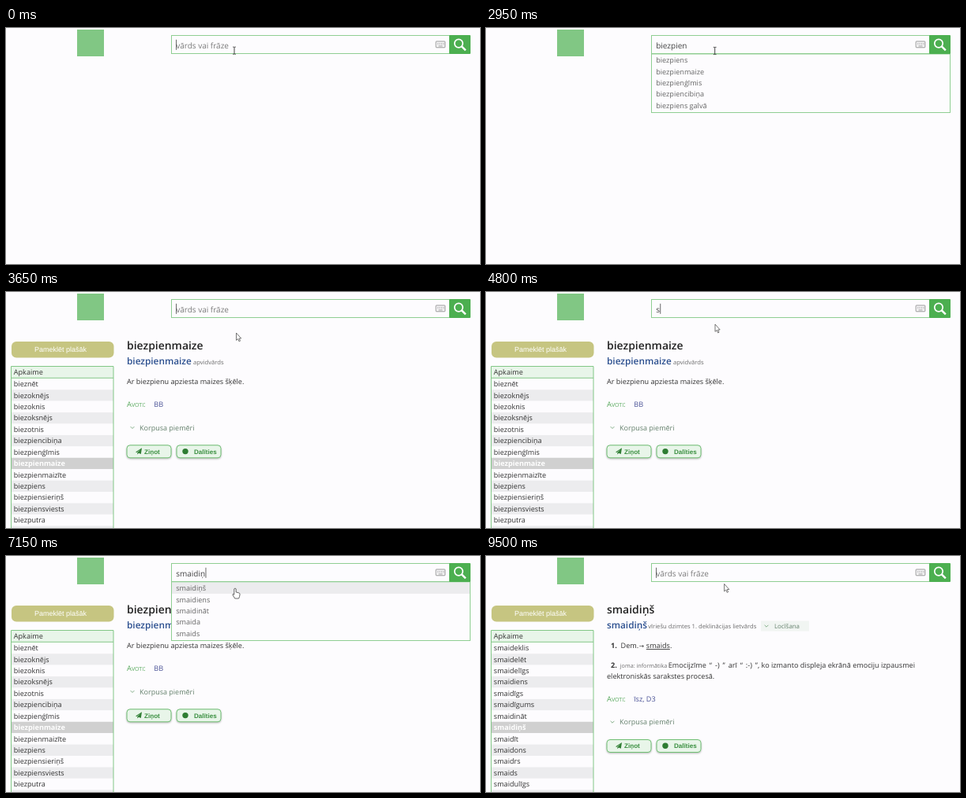
Animation of 600x300 px, one loop 9650 ms. Source, as an HTML page:

```html
<!DOCTYPE html>
<html lang="lv">
<head>
<meta charset="utf-8">
<title>Vārdnīca</title>
<style>
html, body { margin: 0; width: 100%; height: 100%; overflow: hidden; background: #fdfcfe; }
svg { display: block; width: 600px; height: 300px; }
text { font: 9.1px "Open Sans", "Noto Sans", sans-serif; fill: #333; white-space: pre; text-rendering: geometricPrecision; }
.field { font-size: 10px; fill: #444; }
.hint { fill: #7a7a7a; }
.item { fill: #666; }
.title { font-size: 13.95px; font-weight: 600; fill: #212121; }
.word { font-size: 11.8px; font-weight: 600; fill: #2b4f8f; }
.note { font-size: 7.65px; fill: #6c6c6c; }
.topic { font-size: 7.2px; fill: #6c6c6c; }
.arrow { font: 7.5px "DejaVu Sans", sans-serif; }
.quotes { word-spacing: 1.6px; }
.bold { font-weight: 700; }
.link { text-decoration: underline; }
.label { font-size: 9.4px; font-variant: small-caps; fill: #57a85c; }
.ref { fill: #4a5296; }
.more { font-size: 9px; fill: #64806c; }
.small { font-size: 7.9px; }
.row.on { font-weight: 700; fill: #fff; }
.btn { font: bold 8.1px "Liberation Sans", Arial, sans-serif; fill: #3a8f40; }
.wide { font: 9px "Liberation Sans", Arial, sans-serif; fill: #fff; }
.green { stroke: #8fce92; }
.edge { stroke: #6fbf73; }
.shade { filter: drop-shadow(0 1px 1.2px rgba(0, 0, 0, .28)); }
</style>
</head>
<body>
<svg id="stage" viewBox="0 0 600 300"></svg>
<script>
const LOOP = 9650, TICK = 50, ROW = 14.42;
const stage = document.getElementById("stage");

const rect = (x, y, w, h, fill, more = "") =>
  `<rect x="${x}" y="${y}" width="${w}" height="${h}" fill="${fill}" ${more}/>`;
const text = (x, y, s, cls = "", more = "") =>
  `<text x="${x}" y="${y}" class="${cls}" ${more}>${s}</text>`;
const path = (d, stroke, width = 1, fill = "none") =>
  `<path d="${d}" fill="${fill}" stroke="${stroke}" stroke-width="${width}" stroke-linejoin="round"/>`;
const chevron = (x, y) => path(`M${x - 2.4} ${y - 1.2}l2.4 2.4 2.4-2.4`, "#78a67d", .9);

function sidebar(words) {
  const rows = words.split(" ").map((word, i) => {
    const y = 109.8 + i * ROW, on = i === 7;
    const fill = on ? "#d0d0d0" : i % 2 ? "#ececee" : "#fdfcfe";
    return rect(7, y, 129, ROW, fill) + text(9.8, y + 10.4, word, on ? "row on" : "row");
  }).join("");
  return rect(7, 63, 129.5, 20.5, "#c6c581", 'rx="6"') +
    text(69, 76.3, "Pameklēt plašāk", "wide", 'text-anchor="middle"') +
    rows + rect(7, 94.5, 129, 14.5, "#e8f5e9") +
    text(9.8, 105.2, "Apkaime") +
    path("M6.5 300V94.5H136V300M6.5 109.3H136", "#82c786");
}

function button(x, label, icon) {
  return rect(x, 194.8, 56, 16, "#e8f5e9", 'rx="4" class="edge shade"') +
    icon + text(x + 22, 205.6, label, "btn");
}

function footer(dy, refs) {
  const plane = path("M164 203.6L172 198.2 170.8 206 167.9 204.8 166.4 206.6 166.3 204.2 170.3 200.3 165.5 204.1Z",
    "none", 0, "#2e7d32");
  const dot = '<circle cx="227" cy="202.6" r="3.7" fill="#2e7d32"/>';
  return `<g transform="translate(0 ${dy})">` +
    text(153, 146.2, "Avoti:", "label") + text(187.3, 146.2, refs, "ref") +
    chevron(160, 172.3) + text(169, 175.6, "Korpusa piemēri", "more") +
    button(153, "Ziņot", plane) + button(216, "Dalīties", dot) + "</g>";
}

const head = (word) => text(153, 73.2, word, "title") + text(153, 92, word, "word");

const pages = [
  "",
  sidebar("bieznēt biezoknējs biezoknis biezoksnējs biezotnis biezpiencibiņa biezpienģīmis " +
    "biezpienmaize biezpienmaizīte biezpiens biezpiensieriņš biezpiensviests biezputra &#32;") +
  head("biezpienmaize") + text(237, 92, "apvidvārds", "note") +
  text(153, 117.4, "Ar biezpienu apziesta maizes šķēle.") + footer(0, "BB"),

  sidebar("smaideklis smaidelēt smaidelīgs smaidiens smaidīgs smaidīgums smaidināt " +
    "smaidiņš smaidīt smaidons smaidrs smaids smaidulīgs &#32;") +
  head("smaidiņš") + text(205.3, 92, "vīriešu dzimtes 1. deklinācijas lietvārds", "note") +
  rect(348, 82.5, 61, 13, "#f1f5f2") + chevron(355, 89) +
  text(365, 91.8, "Locīšana", "more small") +
  text(158, 117.2, "1.", "bold") + text(170.5, 117.2, "Dem.") + text(193.8, 117, "→", "arrow") +
  text(202.8, 117.2, '<tspan class="link">smaids</tspan>.') +
  text(158, 141.7, "2.", "bold") + text(169.8, 141.7, "joma: informātika", "topic") +
  text(230.8, 141.7, "Emocijzīme “ -) ” arī “ :-) ”,", "quotes") +
  text(348.6, 141.7, "ko izmanto displeja ekrānā emociju izpausmei") +
  text(153, 156.1, "elektroniskās sarakstes procesā.") + footer(38.7, "īsz, D3")
];

const keyboard = rect(544.2, 17, 11.6, 7.8, "none", 'stroke="#8c8c8c" stroke-width=".9" rx=".6"') +
  `<path d="M546 19.4h9M546 21.1h9" stroke="#999" stroke-width=".9" stroke-dasharray="1 .7"/>` +
  path("M547.5 23h5", "#999", .9);
const lens = '<circle cx="573" cy="19.6" r="5.2" fill="none" stroke="#fff" stroke-width="1.7"/>' +
  path("M576.8 23.4L581.8 28.3", "#fff", 2.5);

stage.innerHTML =
  rect(90, 2, 34, 34, "#81c784") +
  pages.map((p) => `<g class="page">${p}</g>`).join("") +
  `<g id="drop">${rect(209.5, 33, 378, 74.5, "#fdfcfe", 'class="green"')}` +
  rect(210, 0, 377, 14.2, "#ececee", 'id="hover"') +
  [0, 1, 2, 3, 4].map((i) => text(215.2, 44.1 + i * 14.4, "", "item")).join("") + "</g>" +
  rect(209.5, 9.5, 352, 23, "#fdfcfe", 'class="green"') + keyboard +
  rect(561, 9, 27, 24, "#4caf50", 'rx="1"') + lens +
  text(215.2, 25.5, "", "field", 'id="field"') +
  rect(0, 14.8, .8, 13, "#444", 'id="caret"') +
  '<g id="mouse">' +
  path("M-1.8-4.6H-.5L0-4 .5-4.6H1.8M0-4V4M-1.8 4.6H-.5L0 4 .5 4.6H1.8", "#333", .9) +
  path("M-1.2 .8Q0-.8 1.2 .8V5L4.6 5.8Q6.2 6.2 6.1 7.8L5.5 10.8 4.6 13H-.2L-3 8.7Q-3.5 7.2-2.1 7.4L-1.2 8.2Z", "#444", .8, "#fff") +
  path("M0 0V9.4L2.1 7.5 3.6 10.9 5 10.2 3.6 7H6.2Z", "#555", .8, "#fff") +
  "</g>";

// [start, value]: each value holds until the next start
const typed = [
  [0, ""], [400, "b"], [500, "bi"], [650, "bie"], [750, "biez"], [900, "biezp"],
  [1000, "biezpi"], [1150, "biezpie"], [1250, "biezpien"], [3550, ""],
  [4800, "s"], [5050, "sm"], [5250, "smn"], [5600, "sm"], [5750, "sma"],
  [5900, "smai"], [6100, "smaid"], [6700, "smaidi"], [7000, "smaidiņ"], [8350, ""]
];
const lists = [
  [0, ""], [450, "b,bet,bez,būt,bija"], [600, "bieži,bieza,biezs,biete,biedrs"],
  [850, "biezs,biezums,biezoknis,biezenis,biezputra"],
  [1050, "biezpiens,biezputra,biezpienmaize,biezpiena,biezpūtis"],
  [1350, "biezpiens,biezpienmaize,biezpienģīmis,biezpiencibiņa,biezpiens galvā"],
  [3550, ""], [4950, "s,sev,sava,sens,seja"], [5150, "smags,smalks,smilts,smiet,smarža"],
  [5500, "smīna,Simna,smena,sm.,Smērna"], [5700, "smags,smalks,smilts,smiet,smarža"],
  [5850, "smags,smaka,smalks,smarža,smadzene"], [6000, "smaids,smaile,smails,smaida,smaidīt"],
  [6250, "smaids,smaida,smaidīt,smaidīgs,smaidrs"],
  [6850, "smaidiņš,smaidīgs,smaidīt,smaids,smaida"],
  [7150, "smaidiņš,smaidiens,smaidināt,smaida,smaids"], [8350, ""]
];
const shown = [[0, 0], [3550, 1], [8350, 2]];
const blink = [
  [0, 1], [1850, 0], [2400, 1], [2950, 0], [3550, 1], [4200, 0], [4700, 1],
  [7550, 0], [8100, 1], [8950, 0], [9500, 1]
];
const moves = [
  [0, 289, 28.7], [2900, 289, 28.7], [2950, 289.7, 29], [3350, 291.5, 52], [4000, 291.5, 52],
  [4200, 290, 41], [7350, 290, 41], [7850, 356.2, 47], [8600, 356.2, 47], [8950, 301.6, 35.5]
];

const index = (steps, t) => {
  let i = steps.length - 1;
  while (steps[i][0] > t) i--;
  return i;
};
const at = (steps, t) => steps[index(steps, t)][1];

function pointer(t) {
  const i = index(moves, t), [t0, x0, y0] = moves[i], [t1, x1, y1] = moves[i + 1] || [LOOP, x0, y0];
  const p = (t - t0) / (t1 - t0), k = p * p * (3 - 2 * p);
  return [x0 + (x1 - x0) * k, y0 + (y1 - y0) * k];
}

const get = (id) => document.getElementById(id);
const show = (el, on) => { el.style.display = on ? "" : "none"; };
const field = get("field"), caret = get("caret"), drop = get("drop"), hover = get("hover"), mouse = get("mouse");
const items = stage.querySelectorAll(".item"), sheets = stage.querySelectorAll(".page");

function draw(t) {
  const word = at(typed, t), list = at(lists, t), [x, y] = pointer(t);
  sheets.forEach((el, i) => show(el, i === at(shown, t)));

  field.textContent = word || "vārds vai frāze";
  field.setAttribute("class", word ? "field" : "field hint");
  caret.setAttribute("x", word ? 215.6 + field.getComputedTextLength() : 215);
  show(caret, at(blink, t));

  show(drop, list);
  const words = list.split(",");
  items.forEach((el, i) => { el.textContent = words[i] || ""; });
  const row = Math.floor((y - 33.5) / 14.4);
  show(hover, row >= 0);
  hover.setAttribute("y", 33.7 + row * 14.4);

  const shape = y < 33 ? 0 : list ? 1 : 2;
  [...mouse.children].forEach((el, i) => show(el, i === shape));
  mouse.setAttribute("transform", `translate(${x} ${y})`);
}

let last = -1;
function frame() {
  const t = Math.floor(performance.now() % LOOP / TICK) * TICK;
  if (t !== last) draw(last = t);
  requestAnimationFrame(frame);
}
frame();
</script>
</body>
</html>
```
